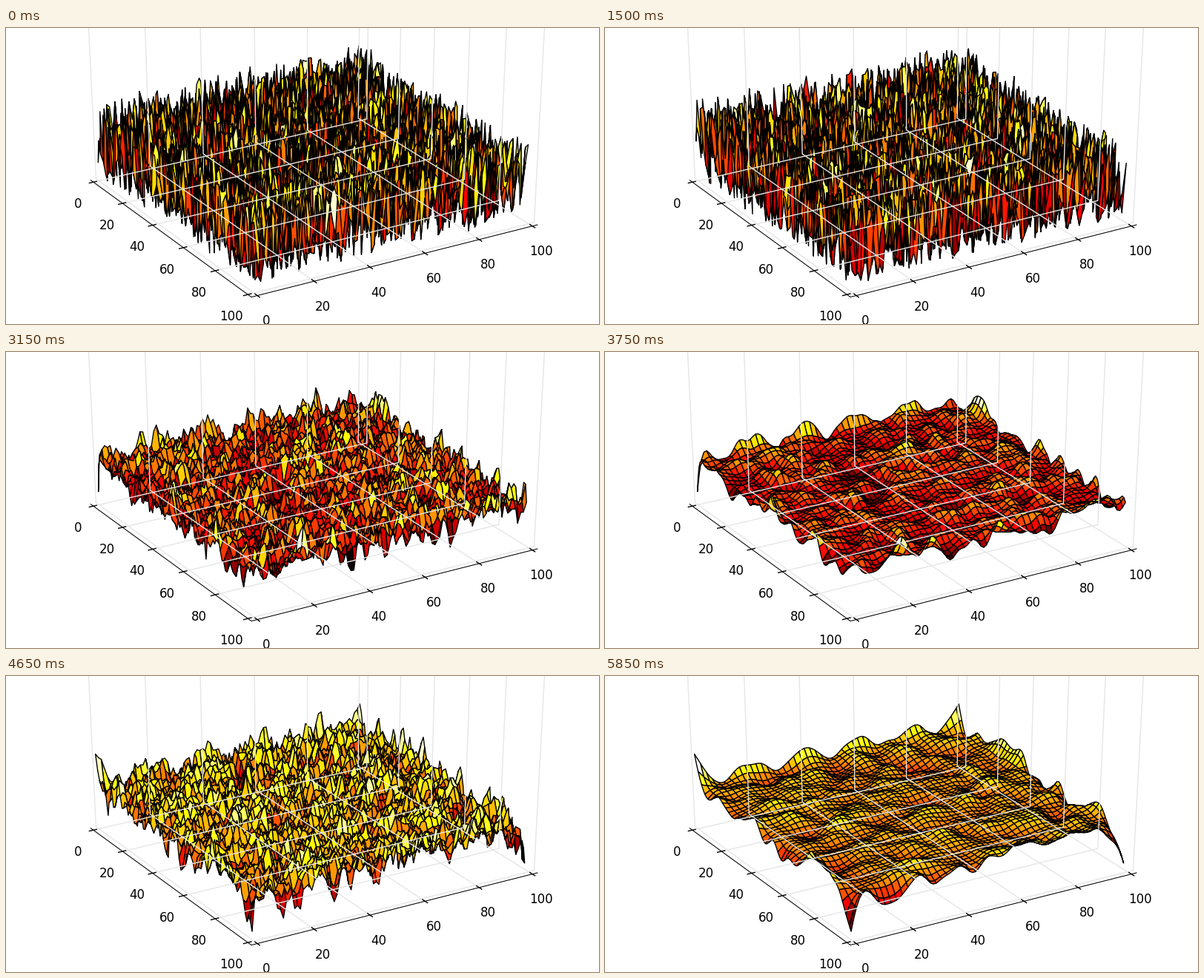
Animation of 800 by 400 pixels, one loop 6000 ms. Source, as a matplotlib script:

```python
import numpy as np
import matplotlib.pyplot as plt
from matplotlib.animation import FuncAnimation
from matplotlib.collections import LineCollection, PolyCollection

plt.rcParams["font.family"] = "DejaVu Sans"

N = 100                # grid points per side
STRIDE = 2             # grid cells per drawn patch
STEPS = 10             # smoothing steps per terrain
TICKS = range(0, 101, 20)
FLOOR_Z = 0.08         # gap between the floor and height 0

# Fixed corner heights of each terrain: left, back, front, right
CORNERS = [(0.17, 0.54, 0.80, 0.96),
           (0.46, 0.58, 0.52, 0.72),
           (0.10, 0.41, 0.58, 0.52),
           (0.93, 0.82, 0.03, 0.03)]

# Homogeneous projection (x, y, w) of the box: origin corner and its edges
ORIGIN = np.array([113.8, 205.3, 1.0])
X_DIR = np.array([193.67, 132.45, -0.0711])
Y_DIR = np.array([387.89, -80.16, 0.0402])
UP = 0.01688 * np.array([406.4, 6029.0, 1.0])


def unit(v):
    """Data coordinate to box fraction, with a small margin at both ends."""
    return (np.asarray(v, float) + 100 / 48) / (100 * 25 / 24)


def screen(u, v, z=0.0):
    u, v, z = (np.asarray(a, float)[..., None] for a in (u, v, z))
    p = ORIGIN + u * X_DIR + v * Y_DIR - z * UP
    return p[..., :2] / p[..., 2:]


def smooth_line(a, times=1):
    for _ in range(times):
        a = np.concatenate([a[:1], (a[:-2] + a[1:-1] + a[2:]) / 3, a[-1:]])
    return a


def smooth(h):
    """3x3 mean inside, 3-point mean along the borders, corners fixed."""
    out = h.copy()
    n = N - 2
    out[1:-1, 1:-1] = sum(h[i:i + n, j:j + n]
                          for i in range(3) for j in range(3)) / 9
    for k in (0, -1):
        out[k] = smooth_line(h[k])
        out[:, k] = smooth_line(h[:, k])
    return out


def terrain(seed, corners):
    """Uniform noise whose back border hides a gentle swell."""
    h = np.random.default_rng(seed).random((N, N))
    swell = 0.58 + 0.13 * np.cos(2 * np.pi * np.arange(N) / 20)
    h[0] = np.clip(swell + h[0] - smooth_line(h[0], 5), 0, 1)
    h[0, 0], h[0, -1], h[-1, 0], h[-1, -1] = corners
    return h


heights = []
for seed, corners in enumerate(CORNERS):
    h = terrain(seed, corners)
    for _ in range(STEPS):
        heights.append(h)
        h = smooth(h)

# Patch outlines as grid indices, farthest patch first
ring = np.array([(0, 0), (0, 1), (0, 2), (1, 2), (2, 2), (2, 1), (2, 0), (1, 0)])
starts = np.stack(np.mgrid[0:N:STRIDE, 0:N:STRIDE], -1).reshape(-1, 2)
starts = starts[np.argsort(starts @ [0.866, -0.5], kind="stable")]
patches = np.minimum(starts[:, None] + ring, N - 1)
rows, cols = patches[..., 0], patches[..., 1]
grid_u, grid_v = unit(np.mgrid[0:N, 0:N])

fig = plt.figure(figsize=(8, 4), dpi=100, facecolor="white")
ax = fig.add_axes([0, 0, 1, 1])
ax.set_xlim(0, 800)
ax.set_ylim(400, 0)
ax.axis("off")

surface = PolyCollection([], cmap="hot", edgecolors="black", linewidths=1, zorder=1)
ax.add_collection(surface, autolim=False)


def add_lines(segments, color, width, zorder):
    ax.add_collection(LineCollection(segments, colors=color, linewidths=width,
                                     zorder=zorder), autolim=False)


def add_label(value, point, dx, dy):
    ax.text(point[0] + dx, point[1] + dy, str(value), fontsize=12,
            ha="center", va="baseline", zorder=4)


grid, ticks = [], []
for value in TICKS:
    s = unit(value)
    grid.append(screen([s, s, s], [0, 1, 1], [0, 0, 5]))
    grid.append(screen([1, 0, 0], [s, s, s], [0, 0, 5]))
    ticks.append(screen([s, s], [-0.016, 0.013]))
    ticks.append(screen([0.984, 1.016], [s, s]))
    add_label(value, screen(s, 0), -20.7 - value / 60, 35)
    add_label(value, screen(1, s), 12, 39.6)

add_lines(grid, "0.9", 1, 2)
add_lines([screen([0, 1, 1], [0, 0, 1])], "black", 0.75, 3)
add_lines(ticks, "black", 1, 3)


def update(frame):
    h = heights[frame]
    points = screen(grid_u, grid_v, h + FLOOR_Z)
    surface.set_verts(points[rows, cols])
    surface.set_array(h[rows, cols].mean(axis=1))
    surface.autoscale()
    return [surface]


anim = FuncAnimation(fig, update, frames=len(heights), interval=150,
                     repeat=True, repeat_delay=0)
plt.show()
```
